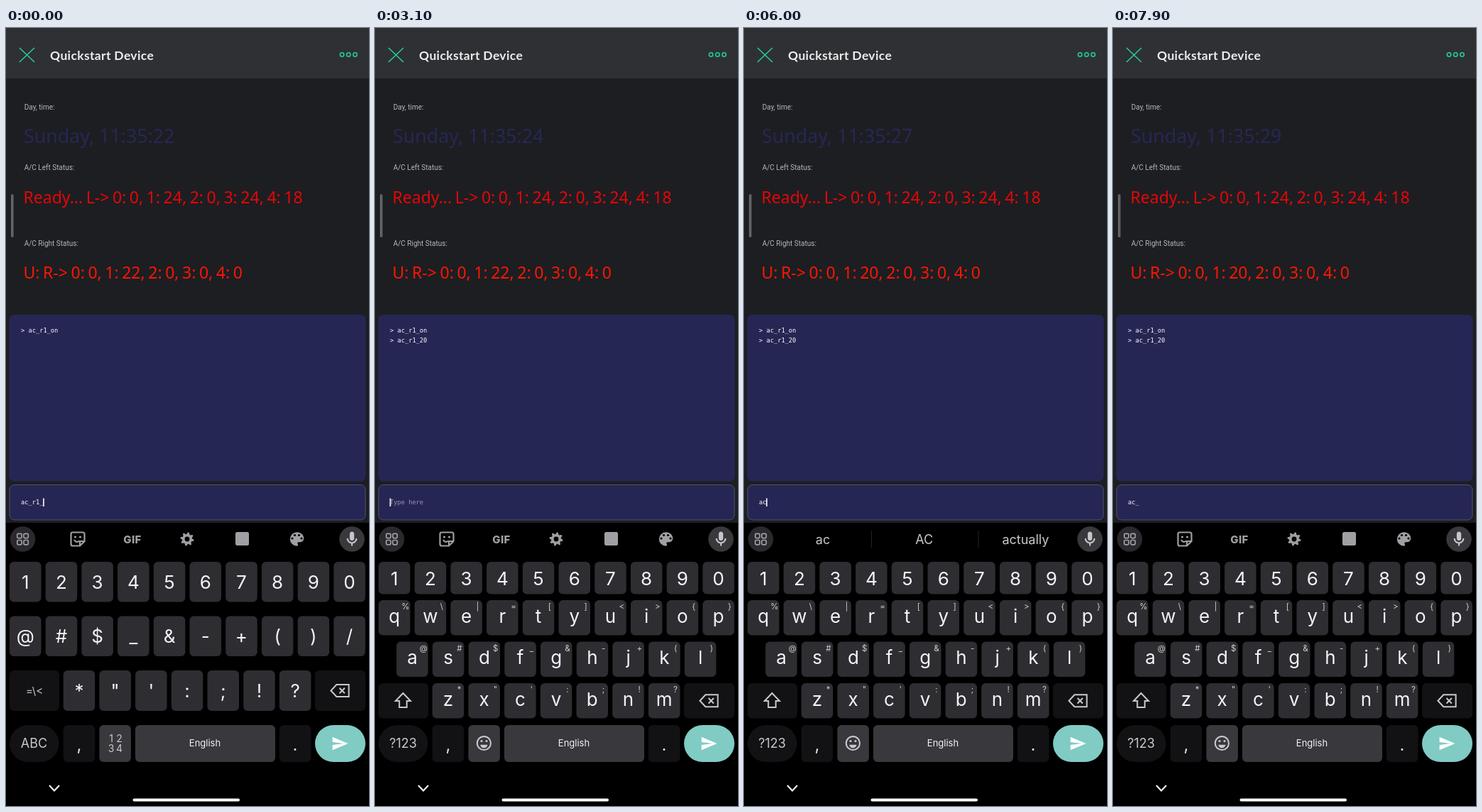
Write an HTML page with a canvas that moves like this. It is 511 by 1096 pixels and loops after 8000 ms.

```html
<!DOCTYPE html>
<html lang="en">
<head>
<meta charset="utf-8">
<title>Quickstart Device</title>
<style>
html, body { margin: 0; width: 100%; height: 100%; overflow: hidden; background: #000; }
canvas { display: block; width: 511px; height: 1096px; }
</style>
</head>
<body>
<canvas id="stage"></canvas>
<script>
const W = 511, H = 1096, LOOP = 8000;
const stage = document.getElementById('stage');
const ratio = window.devicePixelRatio || 1;
stage.width = W * ratio;
stage.height = H * ratio;
const g = stage.getContext('2d');

const UI = 'Inter, Roboto, sans-serif';
const LABEL = 'Roboto, sans-serif';
const STATUS = '"Noto Sans", "Open Sans", sans-serif';
const MONO = '"DejaVu Sans Mono", monospace';
const KEY = '#2e2d31', DARK = '#121114', ICON = '#a09fa3', TEAL = '#24cc97', NAVY = '#262655';
const PITCH = 50.7, KEY_W = 44.5, CHAR_W = 5.24;

// Each list holds [start time, value] steps.
const clock = [[0, 22], [1100, 23], [2100, 24], [3200, 25], [4200, 26], [5100, 27], [7300, 29]];
const typed = [[0, 'ac_r1_'], [1900, 'ac_r1_2'], [2400, 'ac_r1_20'], [2900, ''],
  [5700, 'a'], [6000, 'ac'], [7000, 'ac_']];
const layout = [[0, 'symbols'], [2900, 'letters'], [6500, 'symbols'], [7300, 'letters']];
const strip = [[0, 'tools'], [5700, 'empty'], [6000, 'words'], [7000, 'empty'], [7300, 'tools']];
const stepAt = (steps, t) => steps.findLast(s => s[0] <= t);
const valueAt = (steps, t) => stepAt(steps, t)[1];

function text(s, x, y, size, color, { font = UI, weight = 400, align = 'left', letter = 0, word = 0 } = {}) {
  g.font = `${weight} ${size}px ${font}`;
  g.textAlign = align;
  g.letterSpacing = letter + 'px';
  g.wordSpacing = word + 'px';
  g.fillStyle = color;
  g.fillText(s, x, y);
}

function box(x, y, w, h, r, fill, line) {
  g.beginPath();
  g.roundRect(x, y, w, h, r);
  if (fill) { g.fillStyle = fill; g.fill(); }
  if (line) { g.strokeStyle = line; g.stroke(); }
}

function disc(x, y, r, fill, line) {
  box(x - r, y - r, 2 * r, 2 * r, r, fill, line);
}

// Path on a 24-unit grid, centred on (x, y).
function icon(d, x, y, scale, color, width) {
  g.save();
  g.translate(x - 12 * scale, y - 12 * scale);
  g.scale(scale, scale);
  const path = new Path2D(d);
  if (width) { g.lineWidth = width / scale; g.strokeStyle = color; g.stroke(path); }
  else { g.fillStyle = color; g.fill(path, 'evenodd'); }
  g.restore();
}

function header() {
  g.fillStyle = '#1d1e22';
  g.fillRect(0, 0, W, 697);
  g.fillStyle = '#2f3034';
  g.fillRect(0, 0, W, 71);
  g.lineWidth = 1.6;
  g.strokeStyle = TEAL;
  g.stroke(new Path2D('M19 28L40 48M40 28L19 48'));
  for (const x of [473, 482.2, 491.4]) disc(x, 37.5, 2.7, null, TEAL);
  text('Quickstart Device', 62, 45, 17.5, '#ededee', { font: 'Lato, sans-serif', weight: 700, letter: 0.35 });
}

function readings(t) {
  const label = (s, y) => text(s, 25.7, y, 10, '#b5b6b9', { font: LABEL });
  const status = (s, y, color) => text(s, 24.5, y, 23, color, { font: STATUS, weight: 500, word: -1.4 });
  label('Day, time:', 115);
  label('A/C Left Status:', 200);
  label('A/C Right Status:', 306.5);
  text('Sunday, 11:35:' + valueAt(clock, t), 25, 162, 26.8, '#272754', { font: STATUS });
  status('Ready... L-> 0: 0, 1: 24, 2: 0, 3: 24, 4: 18', 246.5, '#e60606');
  status(`U: R-> 0: 0, 1: ${t < 4200 ? 22 : 20}, 2: 0, 3: 0, 4: 0`, 352.5, '#fb1702');
  box(7, 234, 3.6, 61, 1.8, '#626367');
}

function terminal(t) {
  const mono = (s, y, color = '#fff') => text(s, 21, y, 8.7, color, { font: MONO });
  box(4.5, 404, 502, 234.5, 7, NAVY);
  g.lineWidth = 1;
  box(5, 643.5, 501, 49.5, 7, NAVY, '#50516f');
  mono('> ac_r1_on', 429);
  if (t >= 2900) mono('> ac_r1_20', 442.8);
  const [since, value] = stepAt(typed, t);
  mono(value || 'Type here', 671.3, value ? '#fff' : '#9696ae');
  if ((t - since) % 1000 < 500) {
    g.fillStyle = '#fff';
    g.fillRect(20.7 + value.length * CHAR_W, 662.5, 1.6, 11.5);
  }
}

function gear(x, y) {
  g.beginPath();
  for (let i = 0; i < 32; i++) {
    const a = (i + 0.5) * Math.PI / 16, r = i % 4 < 2 ? 9.6 : 7;
    g.lineTo(x + r * Math.cos(a), y + r * Math.sin(a));
  }
  g.closePath();
  g.fillStyle = ICON;
  g.fill();
  disc(x, y, 3.4, '#000');
}

function tools() {
  icon('M5 2.5H19Q21.5 2.5 21.5 5V15L15 21.5H5Q2.5 21.5 2.5 19V5Q2.5 2.5 5 2.5ZM15 21V15H21M7 13Q10 18 14 14.5', 101, 720, 1, ICON, 2.2);
  disc(97.5, 717, 1.6, ICON);
  disc(104.5, 717, 1.6, ICON);
  text('GIF', 178, 725.5, 15, ICON, { weight: 800, align: 'center', letter: 0.4 });
  gear(255, 720);
  box(323, 710, 19, 19, 2.5, ICON);
  icon('M12 3a9 9 0 0 0 0 18c.83 0 1.5-.67 1.5-1.5 0-.39-.15-.74-.39-1.01-.23-.26-.38-.61-.38-.99 0-.83.67-1.5 1.5-1.5H16c2.76 0 5-2.24 5-5 0-4.42-4.03-8-9-8z', 409.5, 720, 1.08, ICON);
  for (const [x, y] of [[403, 719], [406.5, 714.5], [412.5, 714.5], [416, 719]]) disc(x, y, 1.6, '#000');
}

function words() {
  ['ac', 'AC', 'actually'].forEach((s, i) =>
    text(s, 111 + i * 142.7, 726.5, 18, '#c8c7cb', { align: 'center' }));
  g.fillStyle = '#232326';
  for (const x of [179, 329.5]) g.fillRect(x, 708, 1, 24);
}

function toolbar(t) {
  disc(23.5, 720, 17.8, '#2a292d');
  disc(487, 720, 17.8, '#39383c');
  g.lineWidth = 1.7;
  for (const x of [15.8, 25]) for (const y of [712.3, 721.5]) box(x, y, 6.3, 6.3, 1.5, null, ICON);
  icon('M12 14c1.66 0 3-1.34 3-3V5c0-1.66-1.34-3-3-3S9 3.34 9 5v6c0 1.66 1.34 3 3 3zm5-3c0 2.76-2.24 5-5 5s-5-2.24-5-5H5c0 3.53 2.61 6.43 6 6.92V21h2v-3.08c3.39-.49 6-3.39 6-6.92h-2z', 487, 720, 1.05, '#c6c5c9');
  const mode = valueAt(strip, t);
  if (mode === 'tools') tools();
  if (mode === 'words') words();
}

function keyRow(chars, x, y, h, base, hints = '') {
  [...chars].forEach((c, i) => {
    const left = x + i * PITCH;
    box(left, y, KEY_W, h, 6, KEY);
    text(c, left + KEY_W / 2, base, 26, '#f4f3f7', { align: 'center' });
    if (hints) text(hints[i], left + 38, y + 13, 11.5, '#cfced2', { align: 'center' });
  });
}

function backspace(y, h) {
  box(435, y, 71, h, 6, DARK);
  icon('M7.5 4H24V20H7.5L0 12ZM11.5 8.5L18.5 15.5M18.5 8.5L11.5 15.5', 470, y + h / 2, 1.05, '#c9c8cc', 2);
}

function symbols() {
  keyRow('1234567890', 5, 752, 56.5, 790);
  keyRow('@#$_&-+()/', 5, 828.5, 56.5, 866);
  keyRow('*"\':;!?', 80.7, 905, 57, 943);
  box(5, 905, 70, 57, 6, DARK);
  text('=\\<', 40, 939, 15, '#c9c8cc', { align: 'center' });
  backspace(905, 57);
}

function letters() {
  keyRow('1234567890', 5, 752, 45.5, 784.5);
  keyRow('qwertyuiop', 5, 806, 49.5, 837.5, '%\\|=[]<>{}');
  keyRow('asdfghjkl', 30.2, 864.5, 49.5, 896, '@#$_&-+()');
  keyRow('zxcvbnm', 80.7, 923, 49.5, 954.5, '*"\':;!?');
  box(5, 923, 70, 49.5, 6, DARK);
  icon('M12 2L22 12.5H17V21H7V12.5H2Z', 39.5, 947.5, 1.05, '#c9c8cc', 2);
  backspace(923, 49.5);
}

function bottomRow(isLetters, pressed) {
  const y = 982, h = 52;
  box(5, y, 69.5, h, h / 2, pressed ? '#afaeb1' : DARK);
  text(isLetters ? '?123' : 'ABC', 39.5, 1013.5, 18, pressed ? '#dfdee1' : '#c9c8cc', { align: 'center' });
  box(80.7, y, KEY_W, h, 6, DARK);
  text(',', 103, 1018, 24, '#e6e5e9', { align: 'center' });
  box(131.4, y, KEY_W, h, 6, '#39383c');
  if (isLetters) {
    g.lineWidth = 2;
    disc(153.4, 1007.5, 9.6, null, '#c9c8cc');
    disc(150, 1004.5, 1.6, '#c9c8cc');
    disc(157, 1004.5, 1.6, '#c9c8cc');
    g.beginPath();
    g.arc(153.4, 1009, 5.2, 0.15, Math.PI - 0.15);
    g.fill();
  } else {
    [...'1234'].forEach((c, i) =>
      text(c, 148 + i % 2 * 11.5, i < 2 ? 1006 : 1020, 14, '#c9c8cc', { align: 'center' }));
  }
  box(182, y, 197, h, 6, '#39383c');
  text('English', 280, 1012, 13, '#f4f3f7', { align: 'center' });
  box(384.9, y, KEY_W, h, 6, DARK);
  text('.', 407, 1018, 24, '#e6e5e9', { align: 'center' });
  box(435, y, 71, h, h / 2, '#80cbc4');
  icon('M2 21L23 12 2 3V10L17 12 2 14Z', 470, 1008, 1.04, '#fff');
}

function keyboard(t) {
  g.fillStyle = '#000';
  g.fillRect(0, 697, W, H - 697);
  toolbar(t);
  const isLetters = valueAt(layout, t) === 'letters';
  if (isLetters) letters(); else symbols();
  bottomRow(isLetters, t >= 6300 && t < 6500);
  g.lineWidth = 2;
  g.strokeStyle = '#fff';
  g.stroke(new Path2D('M61 1067L68 1074.5L75 1067'));
  box(178.5, 1085.5, 150.5, 4, 2, '#fff');
}

function draw(now) {
  const t = now % LOOP;
  g.setTransform(ratio, 0, 0, ratio, 0, 0);
  header();
  readings(t);
  terminal(t);
  keyboard(t);
}

let start;
function tick(now) {
  start ??= now;
  draw(now - start);
  requestAnimationFrame(tick);
}
draw(0);
requestAnimationFrame(tick);
</script>
</body>
</html>
```
